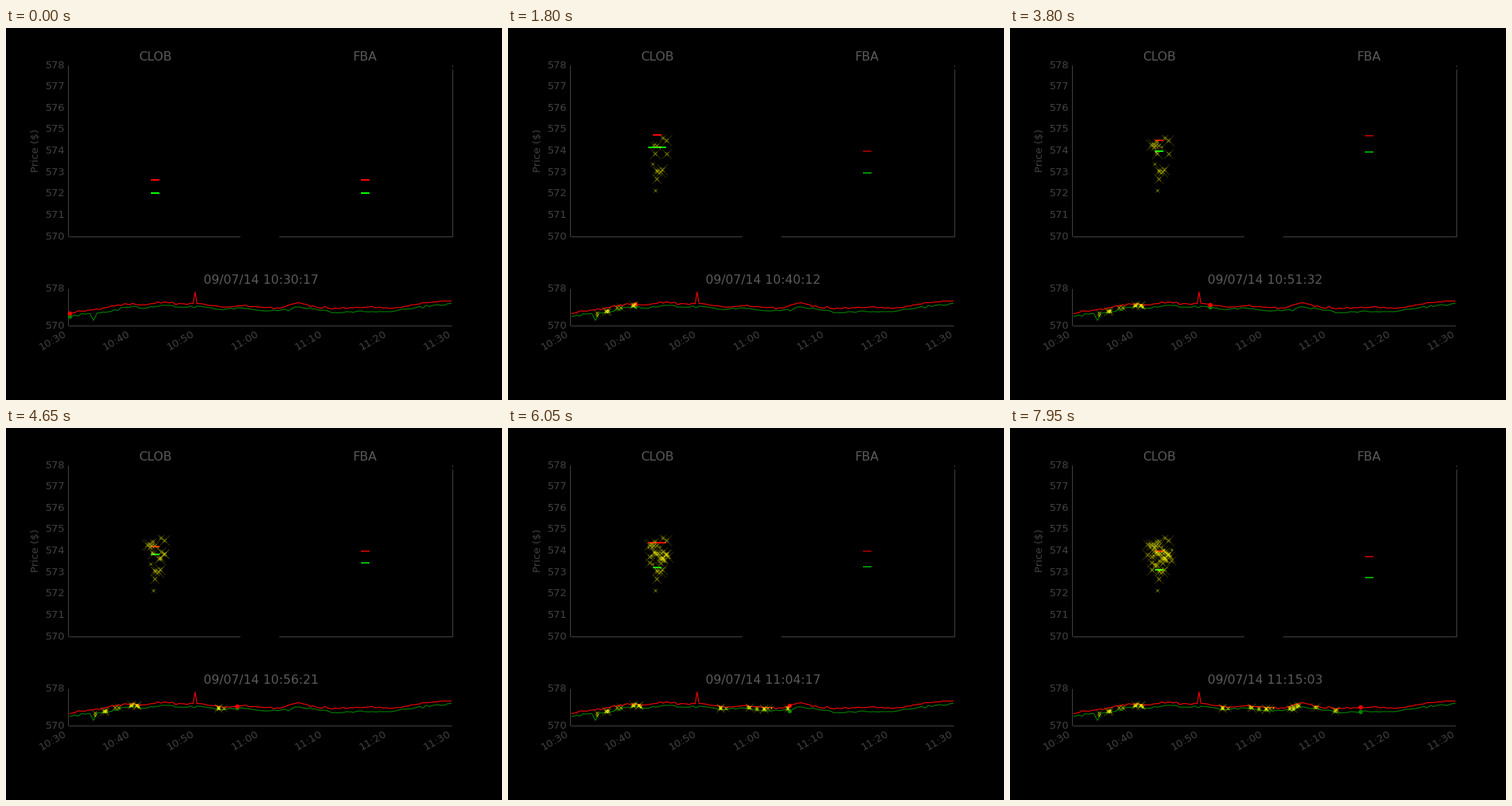
A matplotlib script that plays this animation: 640 px wide and 480 px high, repeating every 8 s.

```python
import matplotlib.pyplot as plt
import numpy as np
from matplotlib.animation import FuncAnimation

W, H, DPI = 640, 480, 80
FRAMES, STEP_S, BATCH = 160, 17, 21
LEFT, RIGHT = 80, 576
BOOK, HISTORY = (48, 269.3), (336, 384.3)  # top and base, 578 to 570
CLOB_X, FBA_X = 192.7, 463.3
SPINE, DIM, TITLE = '#404040', '#424242', '#5b5b5b'

plt.rcParams['font.family'] = 'DejaVu Sans'
fig = plt.figure(figsize=(W / DPI, H / DPI), dpi=DPI, facecolor='black')
ax = fig.add_axes([0, 0, 1, 1])
ax.set(xlim=(0, W), ylim=(H, 0))
ax.axis('off')


def price_y(price, panel):
    top, base = panel
    return base - (price - 570) * (base - top) / 8


def minute_x(m):
    return LEFT + m * (RIGHT - LEFT) / 60


# Quotes: one key price every three minutes, with seeded jitter in between
ASK = [572.6, 573.3, 573.9, 574.7, 574.5, 575.1, 574.7, 574.7, 574, 574.3, 574,
       573.75, 574.95, 573.9, 573.7, 574, 573.9, 573.85, 574.5, 575.1, 575.3]
BID = [572, 572.6, 572.9, 574, 573.7, 574.4, 574, 574.1, 573.45, 573.85, 573.25,
       573.25, 574.05, 573.4, 572.75, 573.1, 573, 573.15, 573.8, 574.4, 574.8]

rng = np.random.default_rng(4)
steps = np.arange(211)
minutes = (steps + 1) * STEP_S / 60
xs = minute_x(minutes)
bridge = np.abs(np.sin(np.pi * minutes / 3))


def quote(keys):
    jitter = np.repeat(rng.normal(0, 0.13, 106), 2)[:len(steps)]
    return np.interp(minutes, np.arange(0, 61, 3), keys) + bridge * jitter


ask, bid = quote(ASK), quote(BID)
ask += 2.5 * np.clip(1 - np.abs(steps - 69), 0, 1)    # spike at 10:50
bid -= 1.6 * np.clip(1 - np.abs(steps - 13) / 2, 0, 1)  # dip at 10:34
depth = rng.choice([1, 2, 3], size=(len(steps), 2), p=[0.84, 0.13, 0.03])

# Trades come in bursts and print between bid and ask
count = 54
bursts = rng.integers(2, FRAMES - 2, 32)
born = rng.choice(bursts, count)
price = bid[born] + (ask - bid)[born] * rng.uniform(0.05, 0.75, count)
size = rng.choice([2.5, 6, 9, 12, 14], count, p=[0.14, 0.12, 0.2, 0.3, 0.24])
core = np.clip(size * 0.4, 1.5, 5)
book_xy = np.column_stack([rng.normal(193.5, 8, count), price_y(price, BOOK)])
hist_xy = np.column_stack([xs[born], price_y(price, HISTORY)])


def spine(x0, y0, x1, y1):
    ax.plot([x0, x1], [y0, y1], color=SPINE, lw=0.9, solid_capstyle='butt')


# Panel frames, broken where dark ticks cross them
spine(LEFT, BOOK[0], LEFT, BOOK[1])
spine(RIGHT, BOOK[0], RIGHT, 49.5)
spine(RIGHT, 53, RIGHT, BOOK[1])
spine(LEFT + 1, BOOK[1], 302, BOOK[1])
spine(352, BOOK[1], RIGHT, BOOK[1])
spine(LEFT, HISTORY[0], LEFT, HISTORY[1])
spine(LEFT + 1, HISTORY[1], RIGHT - 1, HISTORY[1])


def label(x, y, s, size=12, color=DIM, **kw):
    return ax.text(x, y, s, fontsize=size, color=color, **kw)


for panel, ticks in ((BOOK, range(570, 579)), (HISTORY, (570, 578))):
    for p in ticks:
        label(76.3, price_y(p, panel), p, ha='right', va='center')
for m in range(0, 61, 10):
    clock_min = 30 + m
    label(minute_x(m), 388.4, f'{10 + clock_min // 60}:{clock_min % 60:02d}',
          rotation=30, ha='right', va='top')
label(39, 158.5, 'Price ($)', rotation=90, ha='center', va='center')
label(CLOB_X, 42.4, 'CLOB', 14.4, TITLE, ha='center')
label(FBA_X, 42.4, 'FBA', 14.4, TITLE, ha='center')
clock = label(329, 330.4, '', 14.4, TITLE, ha='center')

ax.plot(xs, price_y(ask, HISTORY), color='red', lw=1, zorder=3)
ax.plot(xs, price_y(bid, HISTORY), color='green', lw=1, zorder=3)


def bar(color):
    return ax.plot([], [], color=color, lw=1.8, zorder=4,
                   solid_capstyle='butt')[0]


clob = bar('red'), bar('lime')
fba = bar('red'), bar('lime')
dots = [ax.plot([], [], 'o', color=c, ms=5, mew=0, zorder=4)[0]
        for c in ('green', 'red')]


def crosses(xy, px, lw, alpha):
    marks = ax.scatter(*xy.T, s=(px * 72 / DPI) ** 2, marker='x', c='yellow',
                       linewidths=lw, alpha=alpha, zorder=5)
    return marks, xy


layers = [crosses(book_xy, size, 0.6, 0.25),
          crosses(book_xy, core, 1.4, 0.28),
          crosses(hist_xy, size * 0.8, 0.5, 0.25),
          crosses(hist_xy, core * 0.8, 1.2, 0.45)]


def set_bars(bars, cx, k):
    for line, p, n in zip(bars, (ask[k], bid[k]), depth[k]):
        half = 5.7 * n
        line.set_data([cx - half, cx + half], [price_y(p, BOOK)] * 2)


def update(i):
    k = max(0, i - 1)
    s = 10 * 3600 + 30 * 60 + STEP_S * (k + 1)
    clock.set_text(f'09/07/14 {s // 3600}:{s // 60 % 60:02d}:{s % 60:02d}')
    set_bars(clob, CLOB_X, k)
    # Auction quotes refresh once per batch and fade in between
    age = k % BATCH
    set_bars(fba, FBA_X, k - age)
    for line in fba:
        line.set_alpha(0.96 ** age)
    for dot, p in zip(dots, (bid[k], ask[k])):
        dot.set_data([xs[k]], [price_y(p, HISTORY)])
    seen = (born <= k)[:, None]
    for marks, xy in layers:
        marks.set_offsets(np.where(seen, xy, -50))
    return []


anim = FuncAnimation(fig, update, frames=FRAMES, interval=50,
                     repeat=True, repeat_delay=0, blit=False)
plt.show()
```
